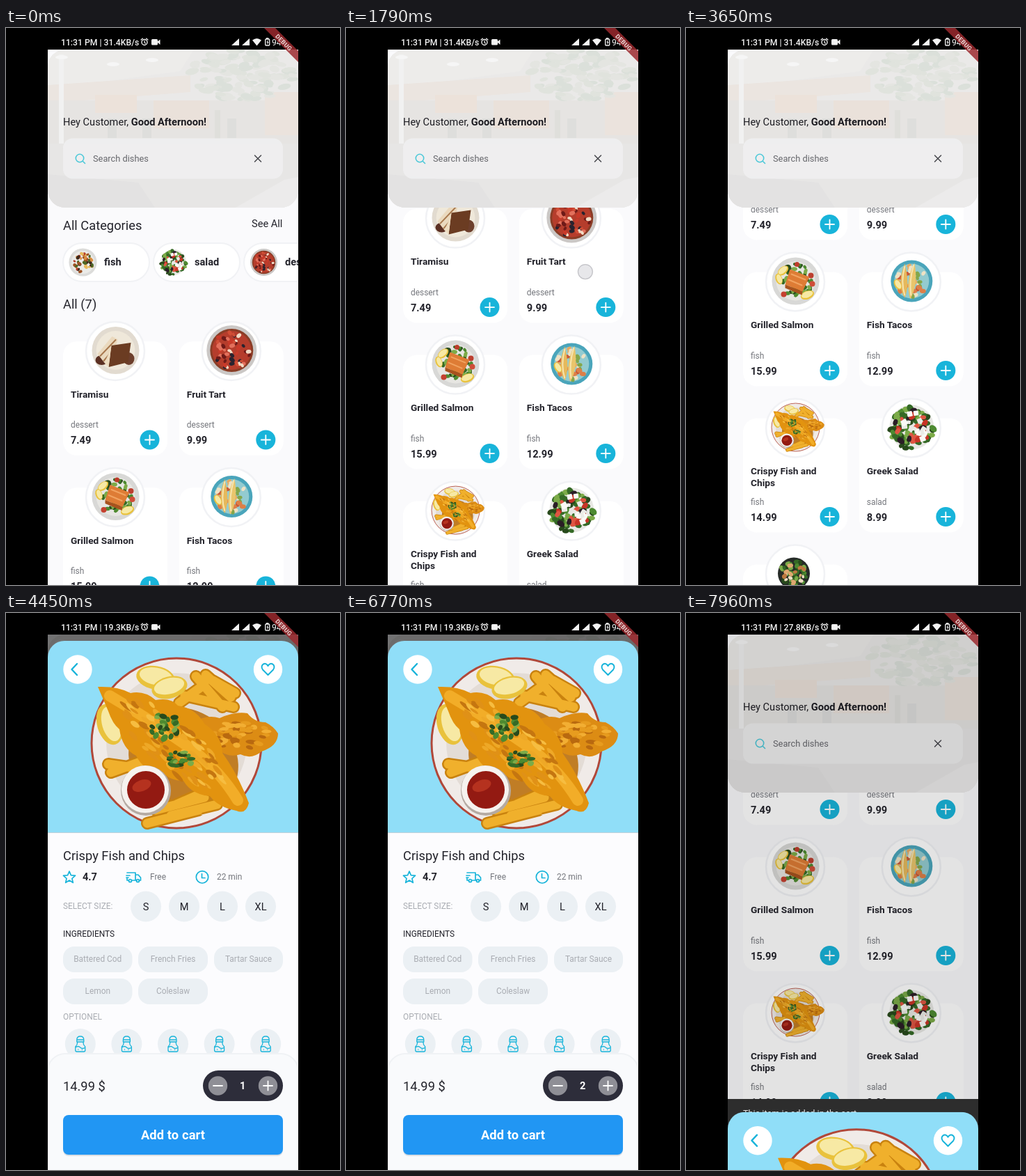
Recreate the animation shown at these times as an HTML page. Size 480 by 800 pixels, loop 8 s.

```html
<!DOCTYPE html>
<html lang="en">
<head>
<meta charset="utf-8">
<title>Food ordering app</title>
<style>
  html, body { margin: 0; width: 100%; height: 100%; overflow: hidden; background: #000; }
  svg { display: block; width: 480px; height: 800px; font-family: Roboto, sans-serif; }
  .b { font-weight: 700; }
  .line { fill: none; stroke: #18b4da; stroke-width: 1.7; stroke-linecap: round; stroke-linejoin: round; }
  #scrim { mix-blend-mode: multiply; }
</style>
</head>
<body>
<svg id="stage" viewBox="0 0 480 800" xmlns="http://www.w3.org/2000/svg"></svg>
<script>
const INK = '#23232b', MUTED = '#74767c', PALE = '#a9acb2', CHIP = '#ebf0f4', TEAL = '#18b4da', WHITE = '#fff';
const LOOP = 8000, LAST = 7960;

const clamp = x => Math.max(0, Math.min(1, x));
const part = (t, from, length) => clamp((t - from) / length);
const $ = id => document.getElementById(id);

// Markup helpers
const text = (x, y, size, str, fill = INK, extra = '') =>
  `<text x="${x}" y="${y}" font-size="${size}" fill="${fill}" ${extra}>${str}</text>`;
const bold = (x, y, size, str, fill = INK, extra = '') => text(x, y, size, str, fill, 'class="b" ' + extra);
const mid = 'text-anchor="middle"';
const circle = (x, y, r, fill, extra = '') => `<circle cx="${x}" cy="${y}" r="${r}" fill="${fill}" ${extra}/>`;
const oval = (x, y, rx, ry, fill, turn = 0) =>
  `<ellipse rx="${rx}" ry="${ry}" fill="${fill}" transform="translate(${x} ${y}) rotate(${turn})"/>`;
const rect = (x, y, w, h, r, fill, extra = '') =>
  `<rect x="${x}" y="${y}" width="${w}" height="${h}" rx="${r}" fill="${fill}" ${extra}/>`;
const path = (d, fill, extra = '') => `<path d="${d}" fill="${fill}" ${extra}/>`;
const icon = (d, extra = '') => `<path class="line" d="${d}" ${extra}/>`;
const stroke = (d, color, width) =>
  path(d, 'none', `stroke="${color}" stroke-width="${width}" stroke-linecap="round"`);
const at = (x, y, inner, more = '') => `<g transform="translate(${x} ${y}) ${more}">${inner}</g>`;

function random(seed) {
  return () => (seed = (seed * 16807) % 2147483647) / 2147483647;
}

// Seeded ovals or cubes scattered over a disc
function scatter(seed, count, reach, size, colors, cubes) {
  const rnd = random(seed * 7919);
  let out = '';
  for (let i = 0; i < count; i++) {
    const a = rnd() * 6.283, d = Math.sqrt(rnd()) * reach, s = size * (0.7 + rnd() * 0.6);
    const x = (Math.cos(a) * d).toFixed(1), y = (Math.sin(a) * d).toFixed(1);
    const color = colors[i % colors.length], turn = Math.round(rnd() * 180);
    out += cubes
      ? rect(-s, -s, 2 * s, 2 * s, 0.8, color, `transform="translate(${x} ${y}) rotate(${turn})"`)
      : oval(x, y, s, s * 0.7, color, turn);
  }
  return out;
}

const lemon = (x, y, size, turn) =>
  at(x, y, oval(0, 0, size, size * 0.6, '#e9c23c') + oval(0, -size * 0.08, size * 0.85, size * 0.44, '#f7e9a4'), `rotate(${turn})`);
const plate = (r, rim, inner) => circle(0, 0, r, rim) + circle(0, 0, r * 0.82, inner);
const greens = ['#356a26', '#4d8a30', '#7cab48', '#284a1c'];

const fries = 'M4 -58L40 -84M12 -68L82 -52M28 -96L66 -52M42 -98L78 -66M52 -90L84 -72M-42 115L32 96M-8 104L58 88M-30 96L40 78M0 88L50 66M-98 30L-42 38M-94 42L-50 26';
const fishBody = 'M-113 -81Q-84 -82 -66 -72Q-46 -76 -30 -62Q-8 -66 2 -54Q28 -50 40 -28Q66 -10 66 14Q88 44 104 86Q100 103 86 97Q60 92 48 76Q22 74 10 54Q-10 54 -22 40Q-46 42 -58 18Q-78 8 -82 -20Q-92 -28 -98 -46Z';
const fishSide = 'M24 -30Q44 -42 62 -36Q84 -46 102 -43Q112 -30 128 -30Q140 -24 146 -14Q146 4 122 12Q108 24 92 16Q74 22 58 8Z';

const foods = {
  fishChips: plate(123, '#f0ebe8', '#e3dcd6') +
    circle(0, 0, 122, 'none', 'stroke="#b0483a" stroke-width="3"') +
    oval(10, 24, 82, 72, '#c07d25', 35) +
    stroke(fries, '#c9820f', 18) + stroke(fries, '#f0b02c', 13) +
    lemon(-30, -94, 28, 10) + lemon(-10, -80, 26, -14) + lemon(-96, -27, 30, 74) +
    path(fishSide, '#dc8c14') + at(92, -12, scatter(8, 40, 25, 4.5, ['#b9690f', '#f2ae33', '#e79c1f']), 'scale(1.6 .85)') +
    path(fishBody, '#e2930f') +
    stroke('M-96 -68Q-40 -35 10 0T88 82', '#f2ad28', 16) +
    at(-6, 2, scatter(3, 90, 54, 5.5, ['#c57610', '#f6bd41', '#e09117', '#ee a827'.replace(' ', '')]), 'rotate(40) scale(1.7 .62)') +
    at(-18, -24, scatter(5, 24, 19, 5, greens), 'scale(1.1 1)') + at(5, 23, scatter(6, 18, 13, 4.2, greens), 'scale(1.4 .85)') +
    circle(-44, 68, 36, '#b5aaa2') + circle(-45, 66, 34, '#f6f2ee') + circle(-44, 67, 27, '#931a12') +
    oval(-50, 61, 14, 8, '#b5321f', -20),
  tiramisu: plate(34, '#e2dbd0', '#efe8da') +
    oval(-20, 14, 9, 7, '#5b2f22') + oval(19, 12, 8, 9, '#6d3f2c') +
    path('M-26 5L-5 -20L3 -16L0 -4L-16 18Z', '#ead9be') + stroke('M-22 8L0 -15M-17 15L0 -5', '#a8794f', 2) +
    path('M-6 -7L22 -11L18 17L-10 24Z', '#6b3c22') + path('M-6 -7L-10 24L-16 18L-8 0Z', '#eddcc0'),
  tart: plate(36, '#cbc8c6', '#d8d5d1') + circle(0, 0, 31, '#8a3d26') + circle(0, 0, 28, '#b53d2c') +
    scatter(11, 48, 27, 3.4, ['#c93a2a', '#f2dcc6', '#6e1a18', '#e3705c', '#29232f', '#d14e36']),
  salmon: plate(34, '#d8d8d6', '#e7e6e2') + scatter(14, 46, 25, 4, greens) +
    lemon(-18, -15, 9, -40) + lemon(17, 20, 10, -20) + lemon(-24, -3, 8, 70) +
    circle(22, -8, 4, '#bc3f2f') + circle(24, 4, 4, '#cf4d38') + circle(-17, 19, 4, '#c5402f') + circle(2, -24, 3.5, '#bd3c2b') +
    path('M-8 -17L20 -6L10 15L-15 5Z', '#de7c35') + path('M-15 5L10 15L9 20L-15 10Z', '#a8521e') +
    stroke('M-6 -10L14 -2M-10 -2L9 6', '#f1a360', 2),
  tacos: circle(0, 0, 30, '#4aa5bb') + circle(0, 0, 25, '#93cbd0') +
    scatter(17, 36, 23, 4, ['#dd7f48', '#e7aa62', '#83a74c', '#efe2c4', '#c95739']) +
    path('M-10 -25Q-22 5 -10 24Q-2 5 -10 -25Z', '#e6b95c') + path('M4 -26Q-10 0 -2 26Q10 4 4 -26Z', '#e9c56c') +
    lemon(-20, 5, 8, 60) + stroke('M3 -23Q-4 0 -1 20M-10 -21Q-16 2 -10 20', '#f6e5b0', 2),
  greek: circle(0, 0, 32, '#e8e8e4') + scatter(21, 70, 31, 5.5, greens) +
    scatter(24, 20, 25, 4.8, ['#c83426', '#df5542', '#2a1e26']) + scatter(29, 13, 24, 3.4, ['#fafaf6', '#ebebe6'], true),
  caesar: circle(0, 0, 23, '#262b28') + scatter(31, 40, 19, 4, greens) +
    scatter(33, 16, 16, 3.4, ['#dfa870', '#bd7840', '#f0dec4']),
  grilled: plate(34, '#dcdcda', '#ebebe8') +
    scatter(37, 34, 24, 4.6, ['#9c5224', '#d98d40', '#4c6826', '#3d281b', '#e6b95c', '#b53d2c'])
};

// Home page
const dishes = [
  ['tiramisu', ['Tiramisu'], 'dessert', '7.49'],
  ['tart', ['Fruit Tart'], 'dessert', '9.99'],
  ['salmon', ['Grilled Salmon'], 'fish', '15.99'],
  ['tacos', ['Fish Tacos'], 'fish', '12.99'],
  ['fishChips', ['Crispy Fish and', 'Chips'], 'fish', '14.99'],
  ['greek', ['Greek Salad'], 'salad', '8.99'],
  ['caesar', ['Caesar Salad'], 'salad', '9.49']
];

function card([food, title, kind, price], i) {
  const small = food === 'fishChips' ? 'scale(.283)' : '';
  return at(82 + (i % 2) * 166.8, 450 + Math.floor(i / 2) * 210,
    rect(0, 0, 150, 164, 20, WHITE) +
    circle(75, 14, 42, WHITE, 'stroke="#f1f2f5" stroke-width="2.5"') +
    at(food === 'caesar' ? 73 : 75.5, 13, foods[food], small) +
    title.map((line, n) => bold(11, 80.5 + n * 16.8, 13.7, line)).join('') +
    text(11, 124, 11.9, kind, MUTED) + bold(11, 147, 14.6, price, INK) +
    circle(124.5, 141.5, 14, TEAL) + stroke('M118 141.5H131M124.5 135V148', WHITE, 1.8));
}

function pill(x, food, label, scale) {
  return rect(x, 309, 124, 55, 27.5, WHITE, 'stroke="#f1f2f5" stroke-width="2"') +
    at(x + 28.5, 336.5, foods[food], `scale(${scale})`) + bold(x + 59, 341, 14.6, label);
}

function header() {
  const tree = at(340, 66, scatter(41, 110, 48, 6, ['#e0e3dd', '#dbe0da', '#e4e5e1']), 'scale(1.55 .8)');
  return `<g clip-path="url(#headerClip)">` + rect(60, 31, 360, 227, 0, '#eae9e8') +
    path('M60 31H270L250 62L60 88Z', '#edecea') + path('M60 82L265 68V92L60 108Z', '#ebe5e0') +
    rect(60, 104, 360, 62, 0, '#e6e4e2') + rect(76, 38, 7, 140, 0, '#f1f1f1') +
    rect(128, 96, 60, 26, 0, '#ece2da') + rect(212, 104, 80, 40, 0, '#eae1da') +
    rect(372, 92, 48, 62, 0, '#ebe3dd') + tree + rect(300, 118, 8, 44, 0, '#dfdfdb') +
    [146, 196, 318].map(x => rect(x, 130, 13, 28, 0, '#dededc')).join('') +
    [[80, 42], [154, 52], [210, 46]].map(([x, y]) => oval(x, y, 9, 3, '#f6f6f6')).join('') +
    rect(60, 166, 360, 92, 0, '#e7e6e5') + path('M60 210L190 222L214 258H60Z', '#e3e2e2') +
    path('M330 258L400 218L420 214V258Z', '#ecebeb') + '</g>' +
    text(82, 140, 14.6, 'Hey Customer, <tspan class="b">Good Afternoon!</tspan>', '#1c1c22') +
    rect(82, 158.5, 316, 58, 14, '#f0f0f1', 'fill-opacity=".9"') +
    circle(106, 187, 5.7, 'none', 'stroke="#4cc8d8" stroke-width="1.6"') + stroke('M110.5 191.5L113.5 194.5', '#4cc8d8', 1.6) +
    text(125, 191.5, 12.8, 'Search dishes', '#66676c') + stroke('M357.5 183L366.5 192M366.5 183L357.5 192', '#46474c', 1.5);
}

const home = rect(60, 31, 360, 769, 0, '#fafafc') +
  `<g clip-path="url(#listClip)"><g id="list">` +
  text(82, 290, 18.3, 'All Categories') + text(353, 286, 14.6, 'See All') +
  pill(82, 'grilled', 'fish', 0.59) + pill(212, 'greek', 'salad', 0.58) + pill(342, 'tart', 'dessert', 0.54) +
  text(82, 403, 18.3, 'All (7)') + dishes.map(card).join('') + '</g></g>' + header() +
  `<g id="snack">` + rect(60, 0, 360, 110, 0, '#323232') +
  text(82, 24.5, 12.7, 'This item is added in the cart', WHITE) + '</g>';

// Dish sheet
const chip = (x, y, w, label) =>
  rect(x, y, w, 37, 16, CHIP) + text(x + w / 2, y + 22, 11.9, label, PALE, mid);
const shaker = x => circle(x, 619, 22, CHIP) +
  at(x, 619, icon('M-5 -6Q-5 -11 0 -11T5 -6ZM-5 -6V-3H5V-6M-4 -3Q-4 1 -7 4V9Q-7 11 -5 11H5Q7 11 7 9V4Q4 1 4 -3M-7 5Q-3 2 0 5T7 5', 'style="stroke-width:1.3"') +
    circle(-3, 8, 0.7, TEAL) + circle(2.5, 8.3, 0.7, TEAL));

function star(x, y, r) {
  let d = '';
  for (let i = 0; i < 10; i++) {
    const a = i * Math.PI / 5, s = i % 2 ? r * 0.45 : r;
    d += (i ? 'L' : 'M') + (x + Math.sin(a) * s).toFixed(1) + ' ' + (y - Math.cos(a) * s).toFixed(1);
  }
  return icon(d + 'Z');
}

const sheet = `<g id="sheet"><g clip-path="url(#sheetClip)">` +
  rect(60, 40, 360, 275.5, 0, '#90def8') + rect(60, 315.5, 360, 485, 0, '#fcfcfe') +
  at(245, 187, foods.fishChips) +
  circle(103, 81, 20.7, WHITE) + icon('M102 73L94.5 81L102 89', 'style="stroke-width:2.4"') +
  circle(376.5, 81, 20.7, WHITE) +
  icon('M376.5 89L369 81.5C364 75 373 69 376.5 76C380 69 389 75 384 81.5Z', 'style="stroke-width:2"') +
  text(82, 355, 18.3, 'Crispy Fish and Chips') +
  star(91, 380, 9) + bold(110, 384.3, 14.6, '4.7') +
  icon('M174 373H186V384H181M175.5 384H174V381M186 376H190L193.5 380V384H191M186 384H188M173 377H178M173 380H176') +
  circle(178.5, 384.5, 2, 'none', 'class="line"') + circle(189.5, 384.5, 2, 'none', 'class="line"') +
  text(207, 383.3, 11.9, 'Free', MUTED) +
  circle(282, 379.3, 8.7, 'none', 'class="line"') + icon('M281.5 374.5V380.5H286') +
  text(303, 383.3, 11.9, '22 min', MUTED) +
  text(82, 425.3, 11.9, 'SELECT SIZE:', PALE) +
  ['S', 'M', 'L', 'XL'].map((s, i) => circle(201 + i * 55, 421.5, 22, CHIP) + text(201 + i * 55, 426.5, 14.6, s, INK, mid)).join('') +
  text(82, 465.3, 11.9, 'INGREDIENTS') +
  chip(82, 479, 99.5, 'Battered Cod') + chip(190, 479, 100, 'French Fries') + chip(299, 479, 99, 'Tartar Sauce') +
  chip(82, 525, 99.5, 'Lemon') + chip(190, 525, 100, 'Coleslaw') +
  text(82, 584, 11.9, 'OPTIONEL', PALE) +
  [0, 1, 2, 3, 4].map(i => shaker(106.8 + i * 66.6)).join('') +
  rect(60, 633, 360, 200, 25, '#f9fafc', 'stroke="#f0f2f5" stroke-width="2"') +
  text(82, 685.5, 18.3, '14.99 $') +
  rect(283, 657, 115, 44, 22, '#2d2d3a') +
  circle(304.5, 679, 13.7, '#8f8f96') + circle(376.5, 679, 13.7, '#8f8f96') +
  stroke('M298 679H311M370 679H383M376.5 672.5V685.5', WHITE, 1.8) +
  bold(340.3, 684, 14.6, '1', WHITE, mid + ' id="count"') +
  rect(82, 723, 316, 57, 8, '#6f7a88', 'id="shade"') + rect(82, 721, 316, 57, 8, '#2196f3', 'id="button"') +
  `<g clip-path="url(#buttonClip)">` + circle(268, 735, 0, '#6cb9f5', 'id="ripple" fill-opacity=".55"') + '</g>' +
  bold(240, 756.3, 18.3, 'Add to cart', WHITE, mid + ' letter-spacing=".12"') + '</g></g>';

// System bar and corner ribbon
const statusBar = rect(60, 0, 360, 31, 0, '#000') +
  text(79, 24.6, 12.2, '', '#f4f4f4', 'id="status" font-weight="500"') +
  circle(199, 20.5, 4, 'none', 'stroke="#f4f4f4" stroke-width="1.4"') +
  stroke('M199 18.5V20.8L200.5 22M194 17L196.5 15M204 17L201.5 15', '#f4f4f4', 1.2) +
  rect(209, 16, 9, 8.5, 1.5, '#f4f4f4') + path('M217 20L221.5 16.5V24Z', '#f4f4f4') +
  path('M324 25H335V15ZM339 25H350V15ZM354 17.5Q360.5 12.5 367 17.5L360.5 25.5Z', '#f4f4f4') +
  rect(372.7, 16, 6, 9, 1, 'none', 'stroke="#f4f4f4" stroke-width="1.3"') + rect(374, 14, 3.3, 2, 0, '#f4f4f4') +
  stroke('M376.5 18L375 20.5H377L375.5 23', '#f4f4f4', 1) + text(382, 24.6, 12.2, '94%', '#f4f4f4') +
  path('M371 0H387L420 33V49Z', '#9c2a2e', 'fill-opacity=".85"') +
  at(399.5, 20.5, bold(0, 3.6, 8.8, 'DEBUG', '#ecd8d6', mid + ' letter-spacing=".3"'), 'rotate(45)');

const clip = (id, shape) => `<clipPath id="${id}">${shape}</clipPath>`;
$('stage').innerHTML = '<defs>' +
  clip('phone', rect(60, 0, 360, 800, 0, '#000')) + clip('listClip', rect(60, 258, 360, 542, 0, '#000')) +
  clip('headerClip', rect(60, 31, 360, 227, 25, '#000')) + clip('sheetClip', rect(60, 40, 360, 800, 24, '#000')) +
  clip('buttonClip', rect(82, 721, 316, 57, 8, '#000')) + '</defs>' +
  rect(0, 0, 480, 800, 0, '#000') + '<g clip-path="url(#phone)">' + home +
  rect(60, 31, 360, 769, 0, WHITE, 'id="scrim"') + sheet + statusBar +
  circle(0, 0, 10.5, '#b9b9c2', 'id="touch" fill-opacity=".35" stroke="#96969e" stroke-opacity=".5" stroke-width="1.3"') + '</g>';

// Motion
const DRAG = 930, HALF = 1530, LIFT = 1990, OPEN = 4000, CLOSE = 7765;

function scrollAt(t) {
  if (t < HALF) return 99.5 * part(t, DRAG, 600) ** 2;
  const u = part(t, HALF, LIFT - HALF);
  if (t < LIFT) return 99.5 + 169 * (0.88 * u + 0.12 * u * u);
  return 268.5 + 41 * (1 - Math.exp((LIFT - t) / 46));
}

function touchAt(t) {
  if (t >= DRAG && t < 2250) {
    const u = part(t, HALF, LIFT - HALF);
    return [311 + 58 * u, 540.5 - scrollAt(Math.min(t, LIFT)), 1 - part(t, LIFT, 260)];
  }
  if (t >= 3880 && t < 4060) return [150, 590, 1 - part(t, 3960, 100)];
  if (t >= 5430 && t < 5720) return [370, 681, 1 - part(t, 5560, 160)];
  return [0, 0, 0];
}

// Black veil over the page as a multiplying grey
function scrimColor(p) {
  const v = Math.round(255 - 139 * p);
  return `rgb(${v},${v},${v})`;
}

const set = (id, name, value) => $(id).setAttribute(name, value);
const move = (id, y) => set(id, 'transform', `translate(0 ${y.toFixed(2)})`);

function draw(t) {
  const open = part(t, OPEN, 250), close = part(t, CLOSE, 200);
  const hidden = t < CLOSE ? (1 - open) ** 5 : close ** 5;
  const press = part(t, 7600, 60);
  const [x, y, alpha] = touchAt(t);

  move('list', -scrollAt(t));
  move('sheet', hidden * 768);
  move('snack', 800 - 102 * part(t, 7800, 160));
  set('scrim', 'fill', scrimColor(t < CLOSE ? open : 1 - 0.82 * close));
  $('count').textContent = t < 5500 ? '1' : '2';
  $('status').textContent = `11:31 PM | ${t < 4250 ? '31.4' : t < 7900 ? '19.3' : '27.8'}KB/s`;

  set('button', 'fill', press ? '#2b9bf4' : '#2196f3');
  set('shade', 'fill-opacity', 0.22 + 0.2 * press);
  set('ripple', 'r', t < 7600 ? 0 : 12 + 40 * (t - 7600) / 160);

  set('touch', 'cx', x);
  set('touch', 'cy', y);
  set('touch', 'opacity', alpha);
}

function tick() {
  draw(Math.min(performance.now() % LOOP, LAST));
  requestAnimationFrame(tick);
}
tick();
</script>
</body>
</html>
```
